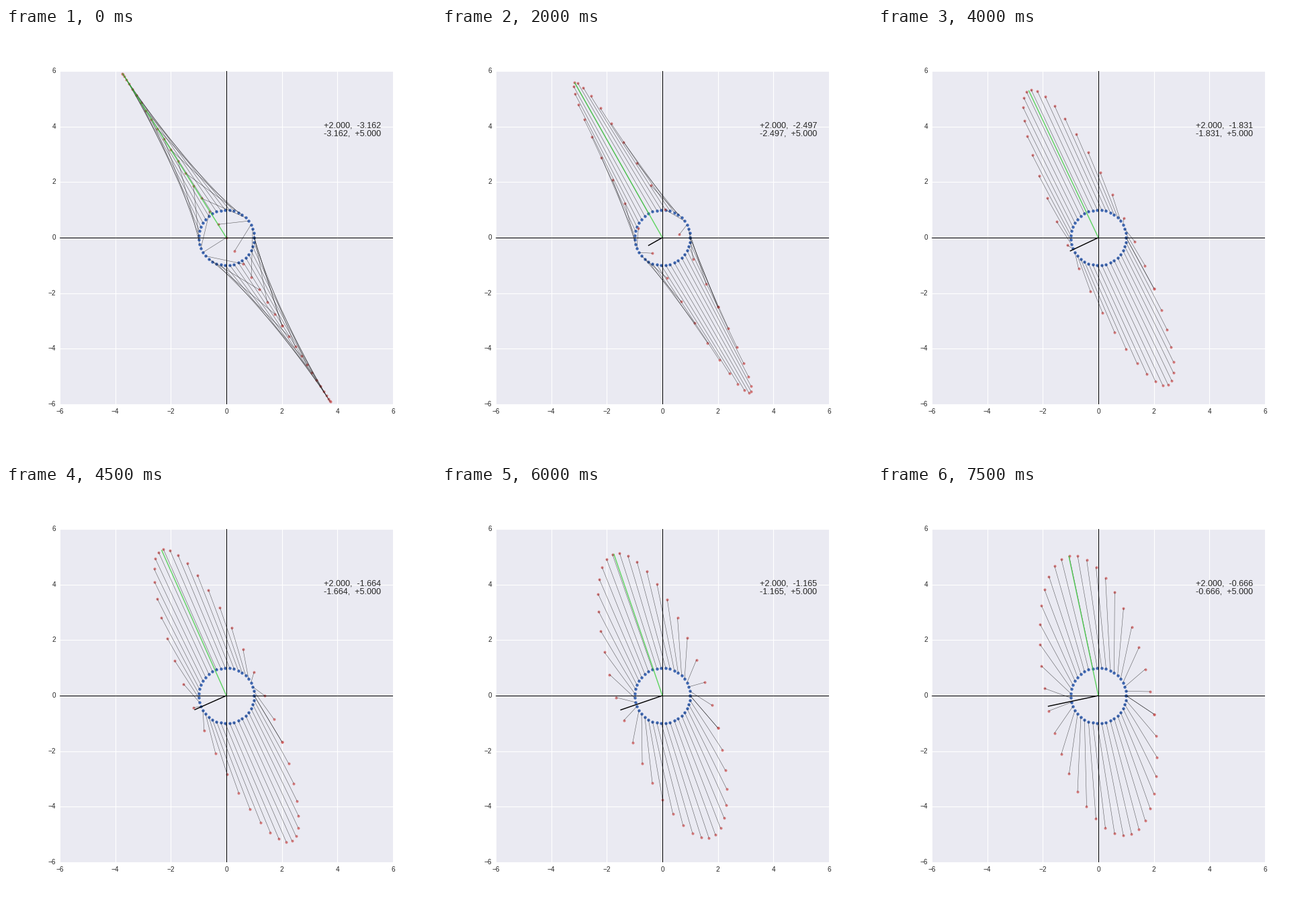
A matplotlib script for the animation above (8 s loop, 640x640 px).

```python
import numpy as np
import matplotlib.pyplot as plt
from matplotlib.animation import FuncAnimation
from matplotlib.collections import LineCollection

FRAMES, INTERVAL = 16, 500
A, D = 2.0, 5.0
B_MIN = -np.sqrt(A * D)   # the matrix is singular here
B_STEP = -B_MIN / 19
INK = "#262626"

plt.rcParams["font.family"] = "Liberation Sans"

fig = plt.figure(figsize=(8, 8), dpi=80, facecolor="white")
ax = fig.add_axes([0.125, 0.125, 0.775, 0.775], facecolor="#eaeaf2")
ax.set(xlim=(-6, 6), ylim=(-6, 6))
ax.set_xticks(range(-6, 7, 2))
ax.set_yticks(range(-6, 7, 2))
ax.grid(color="white", lw=1)
ax.set_axisbelow(True)
ax.tick_params(length=0, pad=5, labelsize=9, labelcolor=INK)
for label in ax.get_yticklabels():
    label.set_va("center")
for spine in ax.spines.values():
    spine.set_visible(False)

theta = np.linspace(0, 2 * np.pi, 40)
circle = np.column_stack([np.cos(theta), np.sin(theta)])

ax.scatter(*circle.T, s=16, color="#3f68b3", lw=0, zorder=1)
images = ax.scatter(*circle.T, s=13, color="indianred", alpha=0.8, lw=0, zorder=1)
links = LineCollection([], colors="black", linewidths=0.5, alpha=0.62, zorder=2)
ax.add_collection(links)
ax.axhline(0, color="black", lw=0.9, zorder=2)
ax.axvline(0, color="black", lw=0.9, zorder=2)


def eigen_line(color, alpha):
    return ax.plot([], [], color=color, alpha=alpha, lw=1.3,
                   solid_capstyle="butt", zorder=3)[0]


major = eigen_line("limegreen", 0.75)
minor = eigen_line("black", 1)
rows = [ax.text(3.5, y, "", size=11.4, color=INK, va="baseline")
        for y in (3.955, 3.665)]


def update(i):
    b = B_MIN + i * B_STEP
    mapped = circle @ np.array([[A, b], [b, D]])
    images.set_offsets(mapped)
    links.set_segments(np.stack([circle, mapped], axis=1))

    mid, radius = (A + D) / 2, np.hypot((D - A) / 2, b)
    big, small = mid + radius, mid - radius
    ux, uy = np.array([b, big - A]) / np.hypot(b, big - A)
    major.set_data([0, big * ux], [0, big * uy])
    minor.set_data([0, -small * uy], [0, small * ux])

    rows[0].set_text(f"{A:+.3f},  {b:+.3f}")
    rows[1].set_text(f"{b:+.3f},  {D:+.3f}")
    return images, links, major, minor, *rows


anim = FuncAnimation(fig, update, frames=FRAMES, interval=INTERVAL,
                     repeat=True, repeat_delay=0, blit=False)
plt.show()
```
